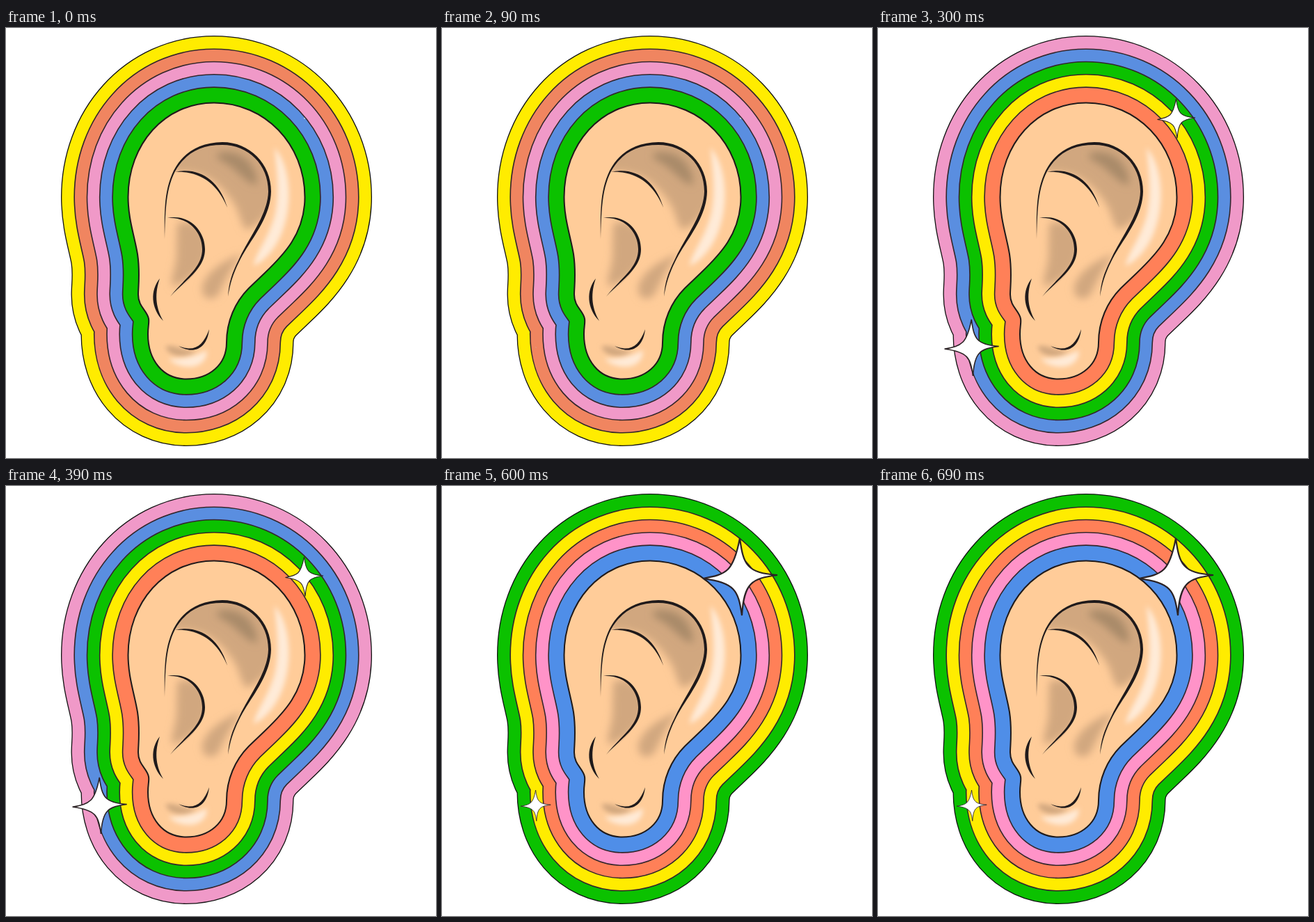
Recreate the animation shown at these times as an HTML page without scripts. Size 618x618 px, loop 750 ms.

```html
<!DOCTYPE html>
<html lang="en">
<head>
<meta charset="utf-8">
<title>Rainbow ear</title>
<style>
  html, body { margin: 0; width: 100%; height: 100%; overflow: hidden; background: #fff; }
  svg { display: block; width: 100vw; height: 100vh; }
  .line { stroke: #33262b; fill: none; }
  .ink { fill: #1f1a1b; }
  .shade { fill: #d1a77f; }
  .glow { fill: #ffebd8; }
</style>
</head>
<body>
<svg viewBox="0 0 618 618">
  <defs>
    <path id="ear" stroke-linejoin="round" d="M299 107.5C372 107.5 429.5 167 429.5 243C429.5 296 398 327 372 352L349 374C329 394 317 422 317 452C317 484 292 504.5 259 504.5C226 504.5 204 478 204 440C204 428 206 424 205 418C203 406 190 401 190 383C190 372 193 352 189 325C185 300 175.5 275 175.5 243C175.5 167 228 107.5 299 107.5Z"/>
    <path id="star" fill="#fff" stroke="#2b2224" stroke-width="2.2" d="M-1-55C4-17 9-5 53-2C16 3 5 9 2 56C-3 20-8 9-54 3C-20-3-10-7-1-55Z"/>
    <clipPath id="fold"><path d="M240 207C255 180 279 166 311 166C350 166 379 196 379 235C378 272 350 303 334 335L319 386V405H260V330L318 258C305 225 280 206 240 207Z"/></clipPath>
    <clipPath id="bowl"><path d="M225 272C262 267 284 292 284 318C284 345 265 362 236 386H220Z"/></clipPath>
    <filter id="soft" x="-50%" y="-50%" width="200%" height="200%"><feGaussianBlur stdDeviation="6"/></filter>
    <filter id="faint" x="-50%" y="-50%" width="200%" height="200%"><feGaussianBlur stdDeviation="3.5"/></filter>
  </defs>

  <!-- Rings: offsets of the ear outline, largest first -->
  <use href="#ear" stroke="#111" stroke-width="193"/>
  <use href="#ear" stroke="#ffec00" stroke-width="190.4">
    <animate attributeName="stroke" dur=".75s" repeatCount="indefinite" calcMode="discrete" values="#ffec00;#f08560;#f099c8;#5a8ee0;#0bc100"/>
  </use>
  <use href="#ear" class="line" stroke-width="156.2"/>
  <use href="#ear" stroke="#f08560" stroke-width="153">
    <animate attributeName="stroke" dur=".75s" repeatCount="indefinite" calcMode="discrete" values="#f08560;#f099c8;#5a8ee0;#0bc100;#ffec00"/>
  </use>
  <use href="#ear" class="line" stroke-width="119.6"/>
  <use href="#ear" stroke="#f099c8" stroke-width="116.4">
    <animate attributeName="stroke" dur=".75s" repeatCount="indefinite" calcMode="discrete" values="#f099c8;#5a8ee0;#0bc100;#ffec00;#ff8058"/>
  </use>
  <use href="#ear" class="line" stroke-width="83.2"/>
  <use href="#ear" stroke="#5a8ee0" stroke-width="80">
    <animate attributeName="stroke" dur=".75s" repeatCount="indefinite" calcMode="discrete" values="#5a8ee0;#0bc100;#ffec00;#ff8058;#ff93c8"/>
  </use>
  <use href="#ear" class="line" stroke-width="46.4"/>
  <use href="#ear" stroke="#0bc100" stroke-width="43.2">
    <animate attributeName="stroke" dur=".75s" repeatCount="indefinite" calcMode="discrete" values="#0bc100;#ffec00;#ff8058;#ff93c8;#4f8ee8"/>
  </use>
  <use href="#ear" fill="#fc9" stroke="#1f1a1b" stroke-width="2"/>

  <!-- Shading -->
  <g clip-path="url(#fold)">
    <path class="shade" filter="url(#soft)" d="M236 208L250 160H395V235C382 262 365 284 346 290C337 284 338 268 326 250C305 220 280 203 236 208Z"/>
    <path fill="#a98a69" filter="url(#soft)" d="M304 180C335 172 361 194 361 225C345 226 333 200 304 188Z"/>
    <path class="shade" filter="url(#soft)" d="M340 324C318 332 288 348 282 372C280 392 300 394 307 380C315 364 322 347 340 324Z"/>
  </g>
  <g clip-path="url(#bowl)">
    <path class="shade" filter="url(#soft)" d="M246 281C270 272 294 290 290 320C285 348 265 362 240 372C234 360 247 342 245 318Z"/>
  </g>
  <path class="shade" filter="url(#faint)" d="M229 458C240 453 254 464 274 465C264 475 236 476 229 458Z"/>
  <path class="glow" filter="url(#faint)" d="M234 475C250 477 270 473 288 463C291 476 278 488 262 487C248 486 239 482 234 475Z"/>
  <path class="glow" filter="url(#faint)" d="M386 172C400 188 409 217 406 253C402 296 383 329 356 342C358 325 377 303 386 270C394 237 389 206 386 172Z"/>

  <!-- Tapered ink lines -->
  <g class="ink">
    <path d="M228 303C227 255 229 230 241 205C255 178 278 165 311 164C350 164 381 195 381 235C380 275 350 305 335 336C326 354 322 368 319 386C320 366 325 352 334 334C348 302 376 270 377 235C377 196 348 168 311 168C279 168 258 180 243 206C231 230 229 255 228 303Z"/>
    <path d="M243 207C277 199 307 219 318 258C304 224 279 205 243 207Z"/>
    <path d="M232 273C264 267 286 292 286 318C286 346 258 362 236 386C256 360 282 345 282 318C282 294 263 271 232 273Z"/>
    <path d="M221 360C207 377 208 403 226 421C214 400 214 380 221 360Z"/>
    <path d="M248 457C270 466 283 458 292 433C289 461 270 470 248 457Z"/>
  </g>

  <!-- Sparkles -->
  <g transform="translate(429 130)">
    <use href="#star" transform="scale(.03)">
      <animateTransform attributeName="transform" type="scale" dur=".75s" repeatCount="indefinite" calcMode="discrete" values=".03;.28;.51;.75;1"/>
    </use>
  </g>
  <g transform="translate(135 459)">
    <use href="#star" transform="scale(.02)">
      <animateTransform attributeName="transform" type="scale" dur=".75s" repeatCount="indefinite" calcMode="discrete" values=".02;.385;.73;1.02;.4"/>
    </use>
  </g>
</svg>
</body>
</html>
```
